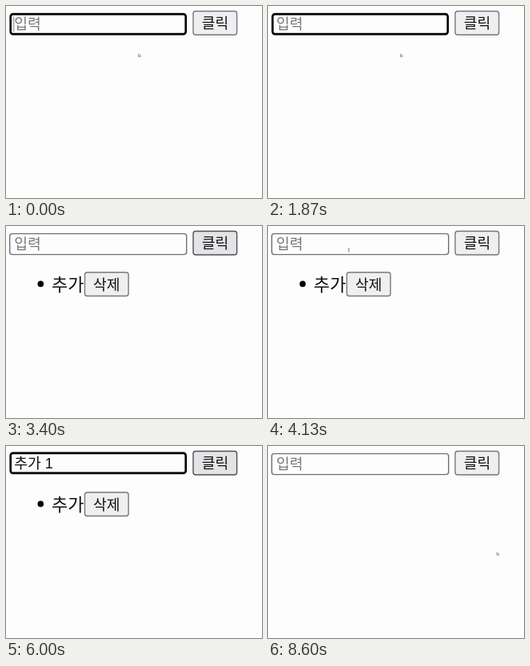
An HTML page for the animation above (8670 ms loop, 320 by 240 pixels).

```html
<!DOCTYPE html>
<html lang="ko">
<head>
<meta charset="utf-8">
<style>
  html, body { margin: 0; width: 100%; height: 100%; overflow: hidden; background: #fdfdfe; }
  svg { display: block; width: 100%; height: 100%; }
  text { font: 18.2px "Liberation Sans", "Noto Sans CJK KR", "Noto Sans CJK", sans-serif; fill: #111; white-space: pre; }
  .item text { font-size: 22px; }
  .button text { font-size: 18.2px; text-anchor: middle; }
  .button rect { fill: #efeff1; stroke: #77777c; stroke-width: 1.4; }
  .button.hover rect { fill: #e4e4e7; stroke: #505056; }
  #box { fill: #fdfdfe; stroke: #707074; stroke-width: 1.4; }
  #field.focus #box { stroke: #000; stroke-width: 2.6; }
  #value.empty { fill: #77777b; }
  #caret { stroke: #888; }
  #underline { stroke: #111; stroke-width: 1.6; }
</style>
</head>
<body>
<svg viewBox="0 0 320 240">
  <g id="field">
    <rect id="box" rx="3"/>
    <text id="value" x="10.3"/>
    <path id="underline"/>
    <path id="caret"/>
  </g>
  <g class="button" data-x="234" data-y="6.5"><rect width="54.6" height="29.5" rx="3"/><text x="27.5" y="21.5">클릭</text></g>
  <g class="item" id="first">
    <circle cx="43.3" cy="72.4" r="3.8"/><text x="57" y="80.7">추가</text>
    <g class="button" data-x="98.5" data-y="58"><rect width="54.6" height="29.5" rx="3"/><text x="27.3" y="21.7">삭제</text></g>
  </g>
  <g class="item" id="second">
    <circle cx="43.3" cy="103.4" r="3.8"/><text x="57" y="111.7">추가 1</text>
    <g class="button" data-x="116" data-y="89"><rect width="54.6" height="29.5" rx="3"/><text x="27.3" y="21.7">삭제</text></g>
  </g>
  <g id="pointer">
    <path id="arrow" d="M0 0V3.6L1 2.8L2 4L2.6 3.5L1.8 2.5L3 2.3Z" fill="#fff" stroke="#66666c" stroke-width=".6"/>
    <path id="beam" d="M-.7 -2H.7M0 -2V2M-.7 2H.7" stroke="#555" stroke-width=".7"/>
  </g>
</svg>
<script>
const LOOP = 8670, STEP = LOOP / 130;
const ADD_1 = 3270, FOCUS = 4270, ADD_2 = 6200, DELETE_2 = 7130, DELETE_1 = 7800;
const CHAR = 16.75;

// [time, text, whether the last syllable is being composed]
const typing = [
  [0, ''], [2130, 'ㅊ', true], [2270, '추', true], [2400, '축', true], [2530, '추가', true],
  [ADD_1, ''], [4670, 'ㅊ', true], [4800, '추', true], [4930, '축', true], [5070, '추가', true],
  [5270, '추가 '], [5470, '추가 1'], [ADD_2, '']
];
const route = [
  [0, 165.5, 60], [2730, 165.5, 60], [3130, 262, 24], [3470, 262, 24],
  [4070, 101, 30], [5530, 101, 30], [5900, 264, 25], [6330, 264, 25],
  [6930, 145, 111], [7270, 144, 111], [7670, 127, 76], [7870, 127, 76],
  [8470, 286, 133], [LOOP + STEP, 286, 133]
];

const $ = id => document.getElementById(id);
const show = (node, on) => node.style.display = on ? '' : 'none';
const inside = (px, py, x, y, w, h) => px > x && px < x + w && py > y && py < y + h;
const buttons = [...document.querySelectorAll('.button')];
for (const b of buttons) b.setAttribute('transform', `translate(${b.dataset.x} ${b.dataset.y})`);

function pointerAt(t) {
  const i = route.findIndex(p => p[0] > t);
  const [t0, x0, y0] = route[i - 1], [t1, x1, y1] = route[i];
  const k = (t - t0) / (t1 - t0), e = k * k * (3 - 2 * k);
  return [x0 + (x1 - x0) * e, y0 + (y1 - y0) * e];
}

function drawField(t) {
  const [since, text, composing] = typing.findLast(s => s[0] <= t);
  const focus = t < ADD_1 || (t >= FOCUS && t < ADD_2);
  const lift = text ? 1.2 : 0;
  const inset = focus ? 1 : 0;
  const attrs = { x: 4.7 + inset, y: 9.6 + inset / 2 - lift, width: 221 - 2 * inset, height: 26 - inset };
  for (const name in attrs) $('box').setAttribute(name, attrs[name]);
  $('field').classList.toggle('focus', focus);
  $('value').textContent = text || '입력';
  $('value').classList.toggle('empty', !text);
  $('value').setAttribute('y', 28.5 - lift / 2);

  const end = text ? 10.3 + $('value').getComputedTextLength() : 9.5;
  $('caret').setAttribute('d', `M${end + .3} ${13.5 - lift}V${32 - lift}`);
  const blinkFrom = text ? since : t < ADD_1 ? 0 : FOCUS;
  show($('caret'), focus && (t - blinkFrom) % 1000 < 500);
  $('underline').setAttribute('d', `M${end - CHAR} 31.5H${end}`);
  show($('underline'), composing);
}

function draw(now) {
  // Snap to the frame rate, allowing for times rounded to 10 ms.
  const t = Math.floor(((now + 5) % LOOP) / STEP) * STEP + 1;
  const [x, y] = pointerAt(t);
  drawField(t);
  show($('first'), t >= ADD_1 && t < DELETE_1);
  show($('second'), t >= ADD_2 && t < DELETE_2);
  let overButton = false;
  for (const b of buttons) {
    const hover = b.getClientRects().length > 0 && inside(x, y, +b.dataset.x, +b.dataset.y, 54.6, 29.5);
    b.classList.toggle('hover', hover);
    overButton ||= hover;
  }
  const overField = inside(x, y, 4, 9, 222, 27);
  show($('arrow'), !overField && !overButton);
  show($('beam'), overField);
  // The pointer hides while keys are being pressed in the field.
  show($('pointer'), !(overField && t > 4670 && t < 5530));
  $('pointer').setAttribute('transform', `translate(${x} ${y})`);
}

const start = performance.now();
function tick() {
  draw(performance.now() - start);
  requestAnimationFrame(tick);
}
tick();
</script>
</body>
</html>
```
